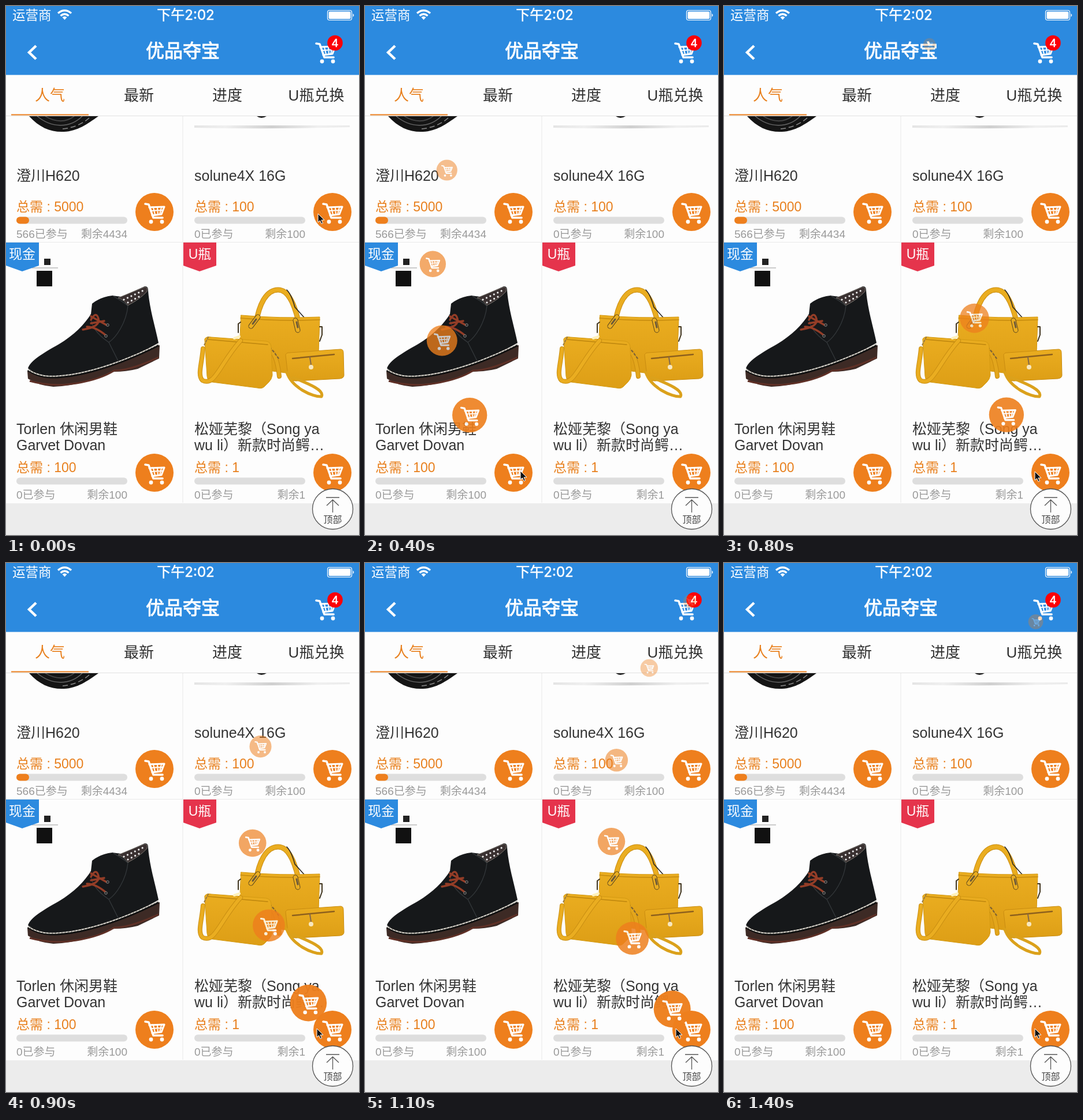
Write an HTML page that moves like this. It is 611x917 px and loops after 1500 ms.

```html
<!DOCTYPE html>
<html lang="zh-CN">
<head>
<meta charset="utf-8">
<title>优品夺宝</title>
<style>
html, body { margin: 0; width: 100%; height: 100%; overflow: hidden; background: #fdfdfd; }
svg { display: block; width: 611px; height: 917px; }
text { font-family: "Liberation Sans", "Noto Sans CJK SC", "Noto Sans CJK", sans-serif; }
.ui { font-family: "Inter", "Noto Sans CJK SC", "Noto Sans CJK", sans-serif; fill: #fff; }
.medium { stroke: #fff; stroke-width: .6; }
.name { font-size: 25px; fill: #333; }
.need { font-size: 23px; fill: #e8801e; }
.note { font-size: 19px; fill: #999; }
.tab { font-size: 26px; fill: #303030; text-anchor: middle; }
.tag { font-size: 23px; fill: #fff; text-anchor: middle; }
.end { text-anchor: end; }
.mid { text-anchor: middle; }
</style>
</head>
<body>
<svg viewBox="0 0 611 917" xmlns="http://www.w3.org/2000/svg">
<defs>
  <g id="cart" fill="none" stroke="#fff" stroke-linecap="round" stroke-linejoin="round">
    <path d="M-16-14L-10-13L-2 10H14" stroke-width="3.6"/>
    <path d="M-9-8L17-9L12 4L-4 6" stroke-width="3.2"/>
    <path d="M-7-2L14-3M-2-8L1 5M5-8L6 5M12-8L9 4" stroke-width="2"/>
    <g fill="#fff" stroke="none"><circle cx="-6" cy="17" r="3.4"/><circle cx="13" cy="17" r="3.4"/></g>
  </g>
  <g id="buy"><circle r="33" fill="#ee7f1d"/><use href="#cart"/></g>
  <linearGradient id="shade">
    <stop offset="0" stop-color="#e4e4e4"/><stop offset=".2" stop-color="#f0f0f0"/>
    <stop offset=".5" stop-color="#cfcfcf"/><stop offset=".8" stop-color="#f0f0f0"/><stop offset="1" stop-color="#eaeaea"/>
  </linearGradient>
  <linearGradient id="gold" x2="0" y2="1">
    <stop offset="0" stop-color="#eaad20"/><stop offset="1" stop-color="#dd9e16"/>
  </linearGradient>
</defs>

<rect width="611" height="917" fill="#fdfdfd"/>

<!-- lens and phone, cut by the tab bar -->
<path d="M40 191C58 211 78 219 100 218C124 217 140 205 160 191Z" fill="#151515"/>
<path d="M54 191C78 211 110 213 132 191" fill="none" stroke="#666" stroke-width="1.5"/>
<path d="M68 191C86 202 104 202 118 191" fill="none" stroke="#444" stroke-width="2"/>
<path d="M98 213Q126 210 144 194" fill="none" stroke="#8a8a8a" stroke-width="1.5" stroke-dasharray="9 5"/>
<path d="M434 191Q442 197 451 191Z" fill="#222"/>
<path d="M326 207H595V210Q460 214 326 211Z" fill="url(#shade)"/>

<!-- shoe -->
<g stroke-linejoin="round">
  <path d="M37 633L38 646Q56 658 82 660Q112 659 150 648L187 634Q208 634 228 629L265 611L266 588L180 612Z" fill="#3d2a25"/>
  <path d="M41 650Q80 661 122 654T187 632Q215 632 264 609" fill="none" stroke="#5f3026" stroke-width="3"/>
  <path d="M38 628C43 614 64 602 92 586C117 571 136 552 147 534L149 516Q164 504 184 502L200 504L240 486Q246 485 246 493C248 523 258 555 264 584C220 609 150 636 92 641Q59 644 38 628Z" fill="#16181a"/>
  <path d="M38 631Q60 646 94 643C148 639 215 613 264 588" fill="none" stroke="#111" stroke-width="4"/>
  <path d="M38 630Q60 645 94 641C148 637 215 611 264 586" fill="none" stroke="#d8d5cc" stroke-width="2" stroke-dasharray="5 .6"/>
  <path d="M194 506L240 487Q246 487 244 495Q232 508 211 519Q204 509 194 506Z" fill="#3a3131" stroke="#77726c"/>
  <path d="M204 509L240 492M211 514L236 501" stroke="#eee" stroke-width="3" stroke-linecap="round" stroke-dasharray=".1 7"/>
  <path d="M184 502Q205 514 211 520C208 550 190 575 178 583L194 615M147 534Q144 560 178 583" fill="none" stroke="#34383b" stroke-width="1.3"/>
  <path d="M147 538L174 553M147 550L170 546M140 556Q155 556 173 571M147 544Q156 528 160 542T133 561" fill="none" stroke="#943d27" stroke-width="3.4" stroke-linecap="round"/>
  <g fill="#222" stroke="#898989"><circle cx="176" cy="553" r="2.3"/><circle cx="173" cy="572" r="2.3"/></g>
</g>
<path d="M45 454H90" stroke="#999"/>
<rect x="66" y="438" width="11" height="11" fill="#222"/>
<rect x="53" y="459" width="27" height="27" fill="#111"/>

<!-- bags -->
<g fill="none" stroke-linejoin="round" stroke-linecap="round">
  <path d="M433 549C438 518 450 492 471 492C489 492 499 517 506 546" stroke="#c98c10" stroke-width="9"/>
  <path d="M433 549C438 518 450 492 471 492C489 492 499 517 506 546" stroke="#eaad20" stroke-width="7"/>
  <path d="M486 492Q494 500 500 522L517 541" stroke="#222" stroke-width="1.5"/>
  <path d="M407 536Q475 542 543 539L541 602Q520 634 484 636L440 630L405 580Z" fill="url(#gold)" stroke="#d5990f"/>
  <path d="M406 541Q475 547 543 544" stroke="#c58a0d" stroke-width="1.5"/>
  <path d="M406 548L402 551V566M543 556H547V570L543 581" stroke="#40351f" stroke-width="2"/>
  <path d="M424 555L436 539M501 545L505 562" stroke="#5b4720" stroke-width="9"/>
  <path d="M424 555L436 539M501 545L505 562" stroke="#eaad20" stroke-width="7"/>
  <path d="M427 551L433 543M503 548L505 557" stroke="#6e5b3a" stroke-width="3"/>
  <path d="M461 600Q470 612 473 642" stroke="#c98c10" stroke-width="8"/>
  <path d="M461 600Q470 612 473 642" stroke="#e3a61c" stroke-width="6"/>
  <path d="M453 586L472 611" stroke="#78603a" stroke-width="2" stroke-dasharray="3 4"/>
  <path d="M344 577Q347 572 355 574L450 581Q458 582 459 591L461 640Q460 647 455 652L447 660Q443 664 435 662L357 652Q349 651 348 642Z" fill="url(#gold)" stroke="#d49a12"/>
  <path d="M349 578L453 587" stroke="#bd850d" stroke-width="1.5"/>
  <path d="M395 576L404 573" stroke="#fff0b8" stroke-width="4"/>
  <path d="M341 594C339 620 331 640 340 649C362 660 370 620 406 580" stroke="#c98e12" stroke-width="8"/>
  <path d="M341 594C339 620 331 640 340 649C362 660 370 620 406 580" stroke="#eaad20" stroke-width="6"/>
  <path d="M350 574L342 590" stroke="#9a7b40" stroke-width="2" stroke-dasharray="3 3"/>
  <path d="M484 605Q484 601 491 601L579 595Q584 595 584 601L585 640Q585 645 578 646L502 650Q489 650 488 641Z" fill="url(#gold)" stroke="#c98c10"/>
  <path d="M496 611L568 604" stroke="#8d601d" stroke-width="2.5"/>
  <path d="M526 609L528 622" stroke="#85694a" stroke-width="2"/>
  <circle cx="528" cy="626" r="4" fill="#f8e8bf"/>
  <path d="M486 635C495 662 531 678 546 677C552 666 524 655 497 644" stroke="#dba11b" stroke-width="5"/>
</g>

<!-- grid -->
<path d="M306 191V861M0 409.5H611" stroke="#e9e9e9" fill="none"/>
<rect y="862" width="611" height="55" fill="#ececec"/>
<path d="M0 410H57V450L28 460L0 450Z" fill="#2c8adf"/>
<path d="M307 410H364V450L335 460L307 450Z" fill="#e5344c"/>
<text class="tag" x="28" y="438">现金</text>
<text class="tag" x="335.500" y="438">U瓶</text>

<text class="name" x="18" y="303">澄川H620</text>
<text class="name" x="326" y="303">solune4X 16G</text>
<text class="name" x="18" y="742">Torlen 休闲男鞋</text>
<text class="name" x="18" y="770">Garvet Dovan</text>
<text class="name" x="326" y="742">松娅芜黎（Song ya</text>
<text class="name" x="326" y="770">wu li）新款时尚鳄…</text>
<g id="cells"></g>

<!-- back to top -->
<circle cx="565.500" cy="872" r="35" fill="#fdfdfd" stroke="#555" stroke-width="1.3"/>
<path d="M554 852H577M565.500 878V856M555 866L565.500 856L576 866" fill="none" stroke="#555" stroke-width="1.3"/>
<text class="mid" x="565.500" y="896" font-size="16" fill="#444">顶部</text>

<!-- header -->
<rect width="611" height="119.500" fill="#2c8adf"/>
<text class="ui" x="11" y="24" font-size="22.500">运营商</text>
<g fill="none" stroke="#fff" stroke-width="3.4">
  <path d="M90 12.500Q101.500 3 113 12.500M94.500 17Q101.500 11 108.500 17"/>
  <path d="M97.500 19.500Q101.500 16.500 105.500 19.500L101.500 24Z" fill="#fff" stroke="none"/>
</g>
<text class="ui medium mid" x="311" y="24" font-size="24">下午2:02</text>
<rect x="556.500" y="7.500" width="42" height="17" rx="3.500" fill="none" stroke="#fff" stroke-width="1.2"/>
<rect x="558.500" y="9.500" width="38" height="13" rx="2" fill="#fff"/>
<path d="M600.500 13Q604 16 600.500 19Z" fill="#fff"/>
<path d="M52 69L40 80.500L52 92" fill="none" stroke="#fff" stroke-width="4.500"/>
<text class="ui medium mid" x="306" y="88.500" font-size="32" style="stroke-width:1">优品夺宝</text>
<use href="#cart" x="553" y="79"/>
<circle cx="569.500" cy="64" r="13.300" fill="#fb0007"/>
<text class="ui medium mid" x="569.500" y="71" font-size="19">4</text>

<!-- tabs -->
<path d="M0 190.500H611" stroke="#e2e2e2"/>
<path d="M9 188.500H143" stroke="#ea8021" stroke-width="2"/>
<text class="tab" x="76" y="163.500" style="fill:#e8801e">人气</text>
<text class="tab" x="230" y="163.500">最新</text>
<text class="tab" x="383" y="163.500">进度</text>
<text class="tab" x="537" y="163.500">U瓶兑换</text>

<g id="sky"></g>
<path id="cursor" d="M0 0V15L3.500 12L6 17.500L8.500 16.500L6 11H11Z" fill="#111" stroke="#fff"/>
</svg>
<script>
const $ = id => document.getElementById(id);
const LOOP = 1500, STEP = 100;
const LEFT = 257, RIGHT = 565, BASE = 809, TOP = 66, CART_X = 553, LAST = 0.15;

// x, y, needed, joined, left, bar width
const cells = [
  [18, 356, 5000, 566, 4434, 22],
  [326, 356, 100, 0, 100, 0],
  [18, 808, 100, 0, 100, 0],
  [326, 808, 1, 0, 1, 0]
];
$('cells').innerHTML = cells.map(([x, y, need, joined, left, bar]) => `
  <text class="need" x="${x}" y="${y}">总需 : ${need}</text>
  <rect x="${x}" y="${y + 9.5}" width="192" height="12" rx="6" fill="#dedede"/>
  <rect x="${x}" y="${y + 9.5}" width="${bar}" height="12" rx="6" fill="#ee7f1d"/>
  <text class="note" x="${x}" y="${y + 46}">${joined}已参与</text>
  <text class="note end" x="${x + 192}" y="${y + 46}">剩余${left}</text>
  <use href="#buy" x="${x + 239}" y="${y + 1}"/>`).join('');

// start x, launch time, climb time
const flights = [
  [LEFT, 160, 340], [LEFT, 251, 306], [LEFT, 302, 318], [LEFT, 357, 320], [LEFT, 401, 380],
  [RIGHT, 680, 333], [RIGHT, 755, 333], [RIGHT, 819, 333], [RIGHT, 878, 353],
  [RIGHT, 945, 353], [RIGHT, 1036, 300], [RIGHT, 1084, 332]
];
const flyers = flights.map(() => {
  const el = document.createElementNS('http://www.w3.org/2000/svg', 'use');
  el.setAttribute('href', '#buy');
  return $('sky').appendChild(el);
});

// time, x, y
const stops = [[0, 540, 360], [100, 400, 590], [200, 269, 806], [500, 410, 806], [600, 538, 807]];

// Bow up to the header, swinging out early, then dash along it to the cart.
function place(x0, u) {
  if (u < 1) {
    const bow = 555 + 230 * (1 - u) ** 6;
    return [x0 - bow * u * (1 - u), BASE + (TOP - BASE) * u];
  }
  const k = (u - 1) / LAST;
  return [x0 + (CART_X - x0) * k, TOP + 2 * k];
}

function draw(t) {
  flights.forEach(([x0, start, climb], i) => {
    const u = (t - start) / climb, el = flyers[i];
    const on = u > 0 && u <= 1 + LAST;
    el.style.display = on ? '' : 'none';
    if (!on) return;
    const [x, y] = place(x0, u);
    el.setAttribute('transform', `translate(${x} ${y}) scale(${1 - 0.64 * u})`);
    el.setAttribute('opacity', 1 - 0.72 * u);
  });
  const [, x, y] = stops.filter(s => s[0] <= t).pop();
  $('cursor').setAttribute('transform', `translate(${x} ${y})`);
}

const born = performance.now();
function tick() {
  const t = (performance.now() - born) % LOOP;
  draw(Math.floor(t / STEP) * STEP);
  requestAnimationFrame(tick);
}
draw(0);
requestAnimationFrame(tick);
</script>
</body>
</html>
```
